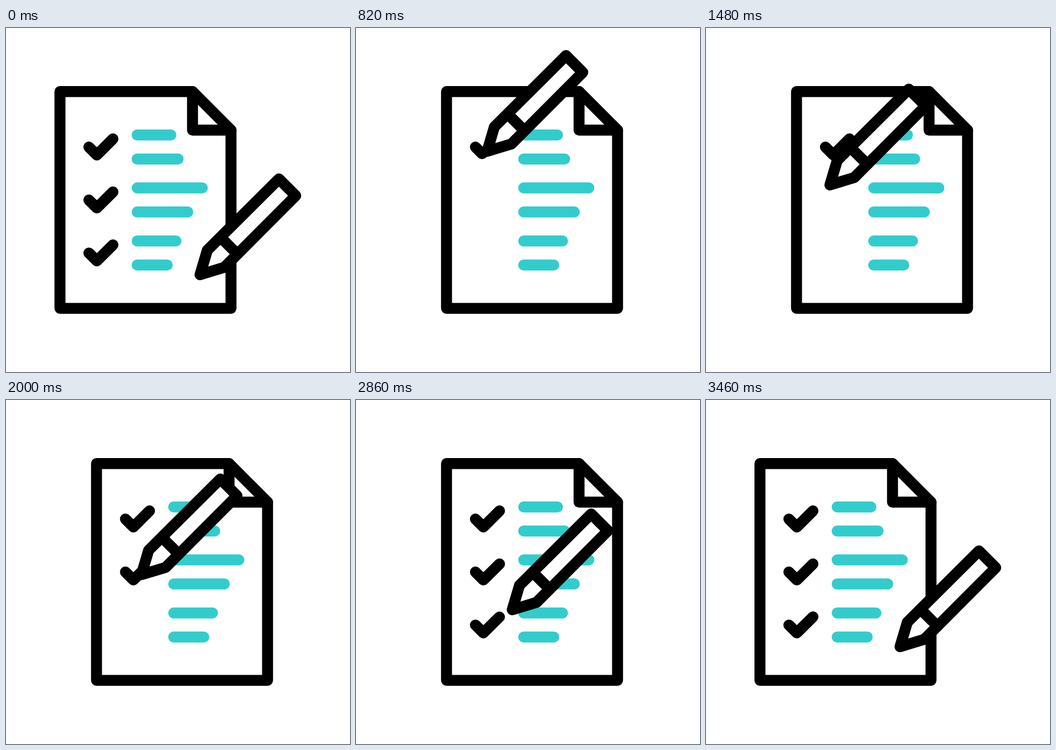
An HTML page for the animation above (3.6 s loop, 640 by 640 pixels).

```html
<!DOCTYPE html>
<html lang="en">
<head>
<meta charset="utf-8">
<title>Checklist</title>
<style>
  html, body { margin: 0; width: 100%; height: 100%; overflow: hidden; background: #fff; }
  svg { display: block; width: 100%; height: 100%; }
  path { fill: none; stroke: #000; stroke-width: 20.4; stroke-linecap: round; stroke-linejoin: round; }
  .filled { fill: #fff; }
  .line { stroke: #3cc; }
</style>
</head>
<body>
<svg viewBox="0 0 640 640">
  <g id="paper">
    <path class="filled" d="M100.4 118.2H347L418.6 190V521.6H100.4Z"/>
    <path d="M347 118.2V190H418.6"/>
    <path class="line" d="M244 199H306.8M244 243.8H320.2M244 297.5H365.2M244 342.3H338.2M244 396.2H316.2M244 441H300"/>
    <path class="check" pathLength="1" d="M154.2 221.5L169 236.2L199 206.3"/>
    <path class="check" pathLength="1" d="M154.2 320L169 334.7L199 304.9"/>
    <path class="check" pathLength="1" d="M154.2 418.6L169 433.3L199 403.5"/>
  </g>
  <!-- The pencil tip sits at the group's origin. -->
  <g id="pencil">
    <path class="filled" d="M0 0L13.5 -45.5L146.8 -178.2L178 -147L45.2 -13.7Z"/>
    <path d="M38.3 -69.5L69.5 -38.4"/>
  </g>
</svg>
<script>
  const LOOP = 3600;
  const paper = document.getElementById('paper');
  const pencil = document.getElementById('pencil');
  const checks = document.querySelectorAll('.check');

  const linear = s => s;
  const smooth = s => s * s * (3 - 2 * s);

  // Each key: time, easing towards it, values.
  const paperKeys = [
    [60, linear, 0], [613, smooth, 68], [2872, linear, 68], [3430, smooth, 0]
  ];
  const pencilKeys = [
    [60, linear, 361, 459],
    [615, smooth, 211.5, 212], [752, linear, 237, 236.5], [1095, linear, 271.5, 201.5],
    [1645, smooth, 219.5, 316.5], [1797, linear, 239, 335.5], [2170, linear, 262.5, 316.5],
    [2470, smooth, 220, 415], [2640, linear, 245, 434], [2872, linear, 293, 388],
    [3430, smooth, 361, 459]
  ];
  const drawTimes = [[675, 1095], [1700, 2170], [2530, 2872]];
  const checkKeys = drawTimes.map(([from, to]) =>
    [[60, linear, 1], [380, smooth, 0], [from, linear, 0], [to, smooth, 1]]);

  function valuesAt(keys, t) {
    const next = keys.findIndex(key => key[0] > t);
    if (next === 0) return keys[0].slice(2);
    if (next < 0) return keys[keys.length - 1].slice(2);
    const [start, , ...from] = keys[next - 1];
    const [end, ease, ...to] = keys[next];
    const k = ease((t - start) / (end - start));
    return from.map((v, i) => v + (to[i] - v) * k);
  }

  function render(t) {
    paper.setAttribute('transform', `translate(${valuesAt(paperKeys, t)} 0)`);
    pencil.setAttribute('transform', `translate(${valuesAt(pencilKeys, t)})`);
    checks.forEach((check, i) => {
      const [drawn] = valuesAt(checkKeys[i], t);
      check.style.visibility = drawn > 0.001 ? 'visible' : 'hidden';
      check.style.strokeDasharray = drawn < 1 ? `${drawn} 2` : 'none';
    });
  }

  const begin = performance.now();
  function tick() {
    render((performance.now() - begin) % LOOP);
    requestAnimationFrame(tick);
  }
  tick();
</script>
</body>
</html>
```
